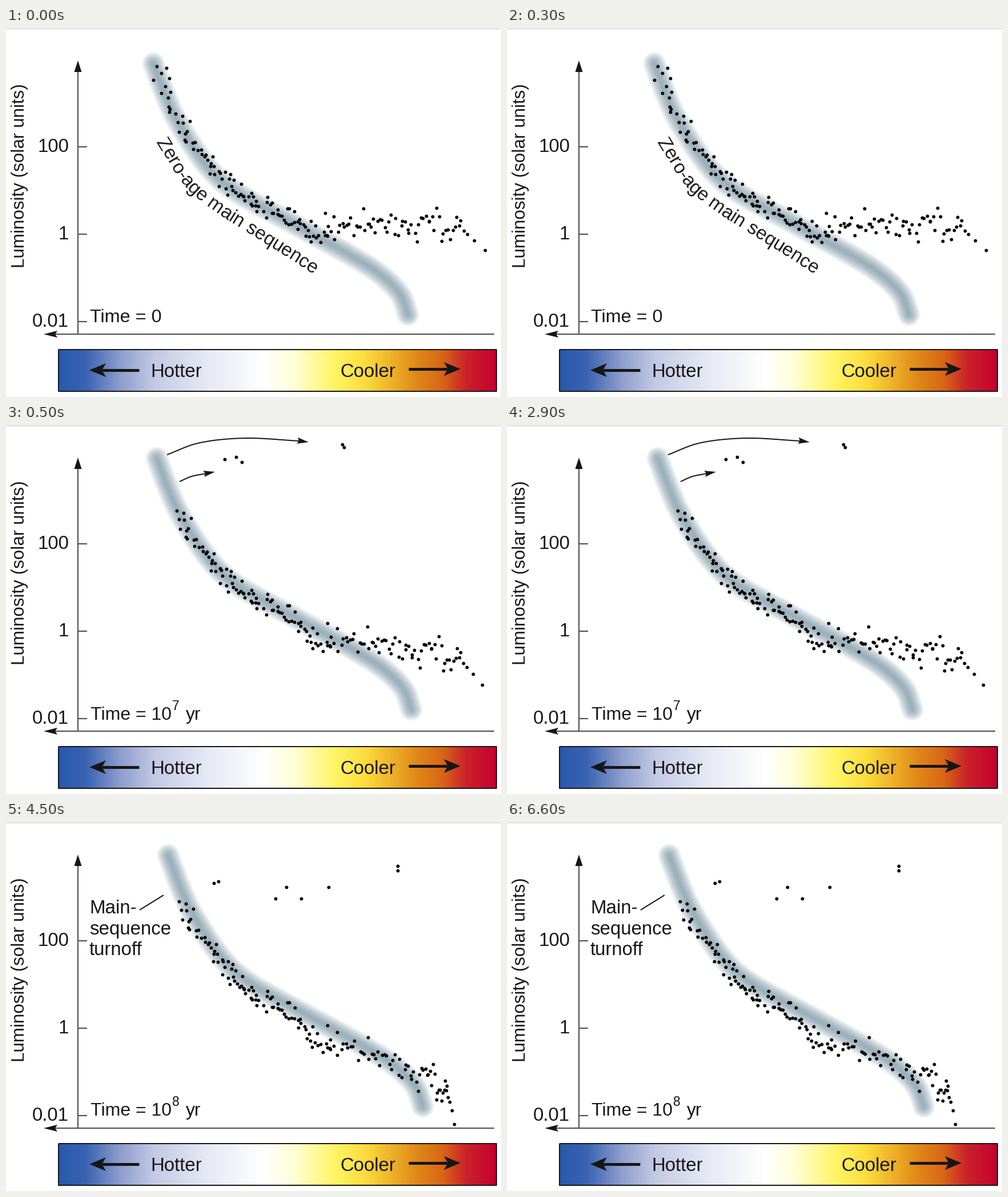
A matplotlib script for the animation above (8 s loop, 867x646 px).

```python
import numpy as np
import matplotlib.pyplot as plt
from matplotlib.animation import FuncAnimation
from matplotlib.colors import to_rgb
from matplotlib.textpath import TextPath

W, H, DPI = 867, 646, 100
PX = 72 / DPI
STEP = 500
FONT = "Liberation Sans"
INK, AXIS = "#161616", "#555555"

fig = plt.figure(figsize=(W / DPI, H / DPI), dpi=DPI, facecolor="white")
ax = fig.add_axes([0, 0, 1, 1])


def text(x, y, s, size=33, **kw):
    kw = {"ha": "left", "va": "baseline", "color": INK, **kw}
    return ax.text(x, y, s, fontsize=size * PX, family=FONT, zorder=5, **kw)


def line(xs, ys, width=2.2, color=AXIS):
    return ax.plot(xs, ys, color=color, lw=width * PX, solid_capstyle="butt", zorder=4)[0]


def head(tip, angle, length, half, notch=0):
    """Arrow head pointing along angle (degrees, y down)."""
    a = np.radians(angle)
    shape = np.array([(0, 0), (-length, half), (notch - length, 0), (-length, -half)])
    turn = np.array([(np.cos(a), np.sin(a)), (-np.sin(a), np.cos(a))])
    return ax.fill(*(shape @ turn + tip).T, color=INK, lw=0, zorder=4)[0]


def smooth(points, n=20):
    """Catmull-Rom curve through the points."""
    p = np.array(points, float)
    p = np.vstack([2 * p[0] - p[1], p, 2 * p[-1] - p[-2]])
    t = np.linspace(0, 1, n, endpoint=False)[:, None]
    out = []
    for a, b, c, d in zip(p, p[1:], p[2:], p[3:]):
        out.append(b + 0.5 * t * (c - a + t * (2 * a - 5 * b + 4 * c - d
                                               + t * (3 * (b - c) + d - a))))
    return np.vstack(out + [p[-2:-1]])


def advance(ch, size):
    def width(s):
        return TextPath((0, 0), s, size=size, prop={"family": FONT}).get_extents().width
    return width("|" + ch + "|") - width("||")


def text_on_path(s, curve, size):
    dist = np.r_[0, np.cumsum(np.hypot(*np.diff(curve, axis=0).T))]

    def at(d):
        return np.array([np.interp(d, dist, c) for c in curve.T])

    pos, made = 0, []
    for ch in s:
        w = advance(ch, size)
        mid = pos + w / 2
        step = at(mid + 5) - at(mid - 5)
        step /= np.hypot(*step)
        x, y = at(mid) - step * w / 2
        turn = -np.degrees(np.arctan2(step[1], step[0]))
        made.append(text(x, y, ch, size, rotation=turn, rotation_mode="anchor"))
        pos += w
    return made


# Colour scale
L, R, TOP, BOTTOM = 92, 859, 563, 636
stops = {92: "#2859ad", 140: "#3a63b2", 200: "#8d9dce", 260: "#c3cae5", 350: "#e6e8f4",
         450: "#ffffff", 500: "#ffffdc", 575: "#fff566", 630: "#fcdc3c", 720: "#e08818",
         765: "#d86615", 805: "#cb232b", 859: "#c4002e"}
xs = np.arange(L, R) + 0.5
rgb = np.array([to_rgb(c) for c in stops.values()])
ramp = np.stack([np.interp(xs, list(stops), ch) for ch in rgb.T], axis=1)
ax.imshow(ramp[None], extent=(L, R, BOTTOM, TOP), aspect="auto", zorder=2)
line([L, R, R, L, L], [TOP, TOP, BOTTOM, BOTTOM, TOP], 2, INK)
text(253, 611, "Hotter")
text(585, 611, "Cooler")
line([168, 233], [599, 599], 5, INK)
head((146, 599), 180, 29, 12, 7)
line([705, 773], [597, 597], 5, INK)
head((796, 597), 0, 29, 12, 7)

# Axes
line([0, W], [0.5, 0.5], 1.2, "#cccccc")
line([126, 126], [66, 536])
line([80, 855], [535.5, 535.5])
head((126, 57), -90, 20, 6.5)
head((66, 536), 180, 24, 6, 4)
for i, label in enumerate(("100", "1", "0.01")):
    y = 208 + 153 * i
    line([126, 142], [y, y])
    text(110, y + 9, label, ha="right")
text(32, 420, "Luminosity (solar units)", 31.4, rotation=90, rotation_mode="anchor")

# Main-sequence band
track = smooth([(258, 62), (280, 120), (303, 168), (350, 239), (400, 285), (500, 341),
                (600, 396), (655, 431), (690, 466), (704, 502)])
shade = np.array([155, 176, 187]) / 255
band = []
for r in np.linspace(20.5, 0.5, 28):
    k = 1 - (r / 21) ** 1.5
    band.append(ax.plot([], [], color=1 - k * (1 - shade), lw=2 * r * PX, zorder=1,
                        solid_capstyle="round", solid_joinstyle="round")[0])
shifts = [(0, 0), (6, -4), (26, -4)]

# Stars: a strip along the band, then a cool group that starts above it
rng = np.random.default_rng(5)


def spread(lo, hi, n):
    return lo + (hi - lo) * (np.arange(n) + rng.random(n)) / n


sx = spread(258, 560, 104)
slope = np.interp(sx, track[:, 0], np.gradient(track[:, 1]) / np.gradient(track[:, 0]))
off = np.clip(rng.normal(3, 8.5, sx.size), -13, 20) / np.hypot(1, slope)
strip = np.stack([sx + off * slope,
                  np.interp(sx, track[:, 0], track[:, 1]) - off], axis=1)

cx = spread(555, 800, 62)
cy = 347 + np.clip(rng.normal(0, 13, cx.size), -32, 30)
tail = spread(795, 840, 4)
cool = np.stack([np.r_[cx, tail], np.r_[cy, 354 + 0.9 * (tail - 800)]], axis=1)
stars = np.vstack([strip, cool])

# Stars that have left the band by each stage
giants = [
    np.empty((0, 2)),
    [(383, 60), (403, 56), (413, 65), (589, 34), (592, 39)],
    [(364, 107), (372, 104), (472, 134), (491, 114), (517, 134), (565, 114), (686, 77),
     (686, 85)],
]


def star_places(k):
    x, y = stars.T
    s = np.clip((x - 500) / 340, 0, 1)
    warm = np.clip((430 - x) / 60, 0, 1)
    dx, dy = [(0 * s, 0 * s),
              (2 * warm + 38 * s * (0.87 - s), 66 * s ** 0.6),
              (6 * warm + 25 * s - 80 * s ** 4, 140 * s ** 0.85 - 11 * warm)][k]
    stay = (x > 290) & (y > 121) if k else x > 0
    return np.vstack([np.stack([x + dx, y + dy], axis=1)[stay], giants[k]])


places = [star_places(k) for k in range(3)]
dots = ax.scatter([], [], s=(5.9 * PX) ** 2, c="black", lw=0, zorder=6)


# Parts that belong to one stage only
def age_label(y, power):
    return [text(148, y, "Time = 10", 32), text(291, y - 17, power, 23),
            text(315, y, "yr", 32)]


def swoop(points, tip, angle):
    return [line(*smooth(points).T, 2, INK), head(tip, angle, 20, 5.5, 3)]


label_path = smooth([(262, 200), (304, 268), (340, 303), (386, 336), (436, 367), (544, 435)])
stages = [
    [text(147, 515, "Time = 0", 32.4)]
    + text_on_path("Zero-age main sequence", label_path, 33),
    age_label(516, "7")
    + swoop([(282, 52), (340, 31), (420, 23), (514, 28)], (530, 30), 8)
    + swoop([(304, 99), (325, 90), (350, 85)], (366, 82), -10),
    age_label(514, "8")
    + [text(146, 160 + 36.5 * i, s)
       for i, s in enumerate(("Main-", "sequence", "turnoff"))]
    + [line([234, 276], [154, 128], 2, INK)],
]

ax.set_xlim(0, W)
ax.set_ylim(H, 0)
ax.axis("off")


def update(i):
    t = i * STEP
    k = int(t >= 500) + int(t >= 4500)
    for j, parts in enumerate(stages):
        for part in parts:
            part.set_visible(j == k)
    for stroke in band:
        stroke.set_data(*(track + shifts[k]).T)
    dots.set_offsets(places[k])
    return []


anim = FuncAnimation(fig, update, frames=8000 // STEP, interval=STEP, repeat=True,
                     repeat_delay=0, blit=False)
plt.show()
```
